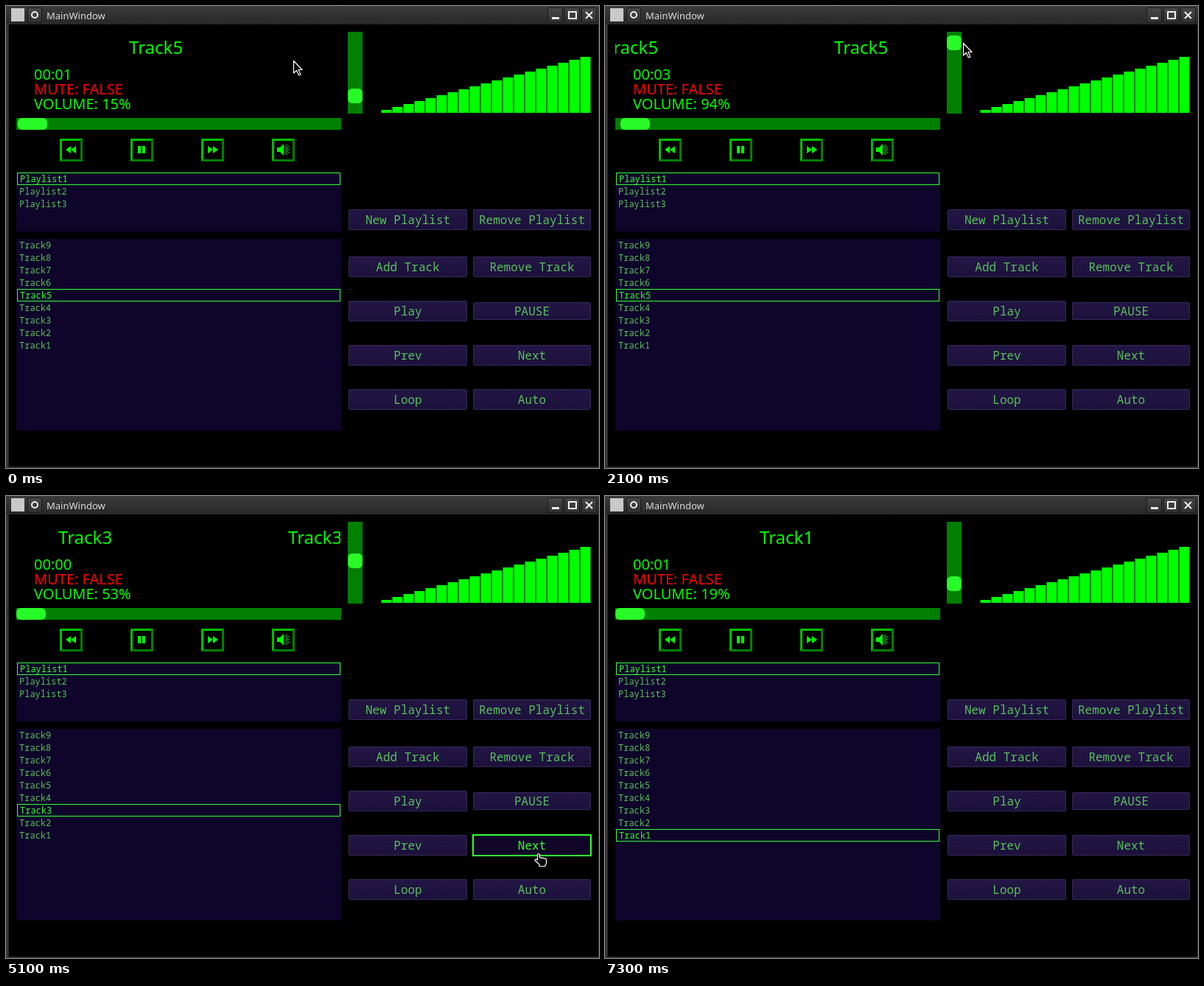
Recreate the animation shown at these times as an HTML page. Size 805 px wide and 627 px high, loop 7400 ms.

```html
<!DOCTYPE html>
<html lang="en">
<head>
<meta charset="utf-8">
<title>Music player</title>
<style>
  html, body { margin: 0; width: 100%; height: 100%; overflow: hidden; background: #000; }
  svg { display: block; }
  text { font-family: "Noto Sans", sans-serif; white-space: pre; }
  .mono { font-family: "Noto Sans Mono", monospace; }
</style>
</head>
<body>
<svg id="stage" width="805" height="627">
  <defs>
    <linearGradient id="bar" x2="0" y2="1">
      <stop stop-color="#3b3b3b"/><stop offset="1" stop-color="#282828"/>
    </linearGradient>
    <linearGradient id="key" x2="0" y2="1">
      <stop stop-color="#484848"/><stop offset="1" stop-color="#303030"/>
    </linearGradient>
    <linearGradient id="face" x2="0" y2="1">
      <stop stop-color="#231645"/><stop offset="1" stop-color="#1c113b"/>
    </linearGradient>
  </defs>
  <g id="chrome"></g>
  <g id="player"></g>
</svg>
<script>
const LOOP = 7400, STEP = 100, TITLE_GAP = 312;
const GREEN = '#00ff00', GROOVE = '#008000', KNOB = '#28fa28', LIT = '#33ff33', SOFT = '#58c05c', PANEL = '#0f042a';

// Keyframes: time, then values, joined by straight lines.
const CURSOR = [
  [0, 390, 74], [600, 474, 118], [800, 480, 121], [1200, 484, 100], [1600, 484, 84],
  [2000, 486, 46], [2400, 486, 60], [3100, 480, 94], [3300, 481, 87], [3900, 721, 485],
  [5100, 723, 485], [5300, 723, 485], [5600, 488, 110], [5900, 476, 96], [6100, 475, 96],
  [6700, 474, 127], [6800, 474, 127], [7200, 53, 1]
];
const VOLUME = [
  [0, 15], [800, 15], [1200, 38], [1600, 56], [2000, 98], [2400, 82],
  [3100, 44], [3300, 53], [6100, 53], [6700, 19]
];
const SCROLL = [[0, 0], [5900, 472], [7200, 579], [7300, 581]];
const CLICKS = [4500, 4900, 5200, 5300];

function at(keys, t) {
  const i = keys.findIndex(k => k[0] > t);
  if (i < 0) return keys[keys.length - 1].slice(1);
  const a = keys[i - 1], b = keys[i], p = (t - a[0]) / (b[0] - a[0]);
  return a.slice(1).map((v, n) => v + (b[n + 1] - v) * p);
}

const times = (n, draw) => Array.from({ length: n }, (_, i) => draw(i)).join('');
const rect = (x, y, w, h, fill, more = '') =>
  `<rect x="${x}" y="${y}" width="${w}" height="${h}" fill="${fill}" ${more}/>`;
const path = (d, fill, more = '') => `<path d="${d}" fill="${fill}" ${more}/>`;
const text = (x, y, size, fill, str, more = '') =>
  `<text x="${x}" y="${y}" font-size="${size}" fill="${fill}" ${more}>${str}</text>`;

function titleBar() {
  const key = (x, w) => rect(x + .5, 2.5, w, 20, 'url(#key)', 'stroke="#1c1c1c" rx="1.5"');
  const line = 'stroke="#eee" stroke-width="2"';
  return rect(0, 0, 805, 627, '#2c2c2c') + rect(0, 0, 805, 25, 'url(#bar)')
    + rect(4, 25, 800, 600, '#000') + rect(1, 25, 1, 602, '#414141')
    + rect(7, 3, 18, 18, '#c9c9c9')
    + key(29, 19) + `<circle cx="39" cy="12" r="4" fill="none" ${line}/>`
    + text(55, 18, 13, '#dcdcdc', 'MainWindow')
    + key(735, 20) + key(758, 20) + key(781, 20)
    + rect(741, 15, 10, 3, '#eee')
    + path('M764 8h10v9h-10z', 'none', line)
    + path('M787 8l9 9m0-9l-9 9', 'none', line);
}

function mediaButton(x, icon) {
  return path(`M${x} 211V180h31l-3 3h-25v25z`, '#00c000')
    + path(`M${x} 211h31V180l-3 3v25h-25z`, GROOVE)
    + `<g transform="translate(${x + 15.5} 195)">${icon}</g>`;
}

function mediaButtons() {
  const rewind = path('M-7.5 0l7-5v10zM-.5 0l7-5v10z', GREEN);
  const pause = rect(-5.5, -5, 4, 10, GREEN) + rect(.5, -5, 4, 10, GREEN);
  const speaker = path('M-8.5-3h4l5-5v16l-5-5h-4z', GREEN)
    + path('M2-3l3-4M3-1.5l5-3M3 0h5M3 1.5l5 3M2 3l3 4', 'none', `stroke="${GREEN}"`);
  return mediaButton(73, rewind) + mediaButton(169, pause)
    + mediaButton(265, `<g transform="scale(-1 1)">${rewind}</g>`) + mediaButton(361, speaker);
}

function button(x, y, w, h, label, hover) {
  const box = hover
    ? rect(x, y, w, h, '#120628', `stroke="${LIT}" stroke-width="2"`)
    : rect(x + .5, y + .5, w - 1, h - 1, 'url(#face)', 'stroke="#352a58" rx="1.5"');
  return box + text(x + w / 2, y + h / 2 + 6, 16, hover ? LIT : SOFT, label, 'class="mono" text-anchor="middle"');
}

function buttons(overNext) {
  const rows = [
    [276, 'New Playlist', 'Remove Playlist'], [340, 'Add Track', 'Remove Track'],
    [400, 'Play', 'PAUSE'], [460, 'Prev', 'Next'], [520, 'Loop', 'Auto']
  ];
  return rows.map(([y, left, right]) => {
    const inset = right === 'PAUSE' ? 2 : 0;
    return button(465, y, 161, 28, left)
      + button(634, y + inset, 160, 28 - 2 * inset, right, right === 'Next' && overNext);
  }).join('');
}

function list(y, height, items, selected) {
  return rect(14, y, 441, height, PANEL) + items.map((name, i) => {
    const top = y + 17 * i, on = name === selected;
    return (on ? rect(15.5, top + .5, 438, 16, PANEL, `stroke="${LIT}"`) : '')
      + text(on ? 19 : 18, top + 13, 12, on ? LIT : SOFT, name, 'class="mono"');
  }).join('');
}

function pointer(t, overNext) {
  if (t >= 7300) return '';
  const [x, y] = at(CURSOR, t).map(Math.round);
  const arrow = 'M.5.5V17l4-3.5 3 6.5 2.5-1-3-6.5H12z';
  const hand = 'M-1.5 9V1.5q1.5-2 3 0V6q1.5-1 3 .5 1.5-1 3 .5 2-.5 3 1.5v4q0 2-1.5 3.5v1.5H1V15l-6-5.5q0-2 2-1.5z';
  return `<g transform="translate(${x} ${y})">`
    + path(overNext ? hand : arrow, '#000', 'stroke="#fff" stroke-width="1.2" stroke-linejoin="round"') + '</g>';
}

function player(t) {
  const done = CLICKS.filter(c => c <= t).length;
  const track = 'Track' + (5 - done);
  const start = done ? CLICKS[done - 1] + 300 : -1150;
  const seconds = Math.max(0, t - start) / 1000;
  const volume = Math.round(at(VOLUME, t)[0]);
  const overNext = t >= 3900 && t < 5300;
  const titleX = (167 - at(SCROLL, t)[0] + 2 * TITLE_GAP) % TITLE_GAP;
  const progress = 14 + Math.round(done ? 0 : seconds * 2.1);

  return '<svg x="14" y="35" width="440" height="42">'
    + times(3, i => text(titleX - 14 + (i - 1) * TITLE_GAP, 30, 24, GREEN, track)) + '</svg>'
    + text(38, 100, 20, GREEN, '00:0' + Math.floor(seconds))
    + text(38, 120, 20, '#ff0000', 'MUTE: FALSE')
    + text(38, 140, 20, GREEN, `VOLUME: ${volume}%`)
    + rect(14, 152, 441, 16, GROOVE) + rect(progress, 152, 40, 16, KNOB, 'rx="6"')
    + rect(464, 35, 20, 111, GROOVE) + rect(464, Math.round(126 - volume * .91), 20, 20, KNOB, 'rx="6"')
    + list(226, 80, ['Playlist1', 'Playlist2', 'Playlist3'], 'Playlist1')
    + list(316, 260, Array.from({ length: 9 }, (_, i) => 'Track' + (9 - i)), track)
    + buttons(overNext) + pointer(t, overNext);
}

const chromeLayer = document.getElementById('chrome');
const playerLayer = document.getElementById('player');
chromeLayer.innerHTML = titleBar() + mediaButtons()
  + times(19, i => rect(509.5 + 15 * i, 141 - 4 * i, 14, 4 + 4 * i, GREEN));

let shown = -1;
function frame(now) {
  const t = Math.floor(now % LOOP / STEP) * STEP;
  if (t !== shown) playerLayer.innerHTML = player(shown = t);
  requestAnimationFrame(frame);
}
frame(performance.now());
</script>
</body>
</html>
```
